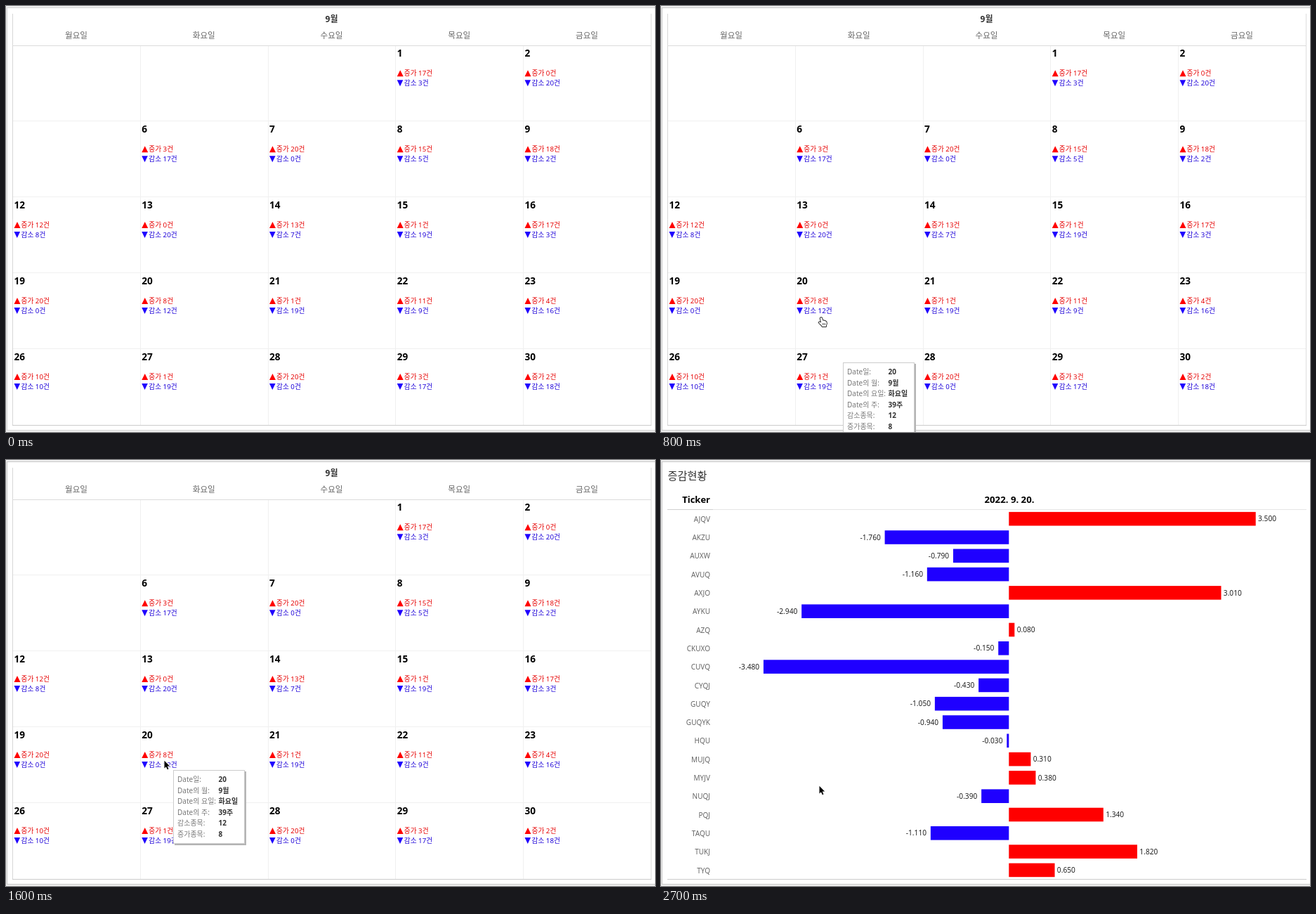
These frames come from a looping animation (924x606 px, 3200 ms). An HTML page with a canvas:

```html
<!DOCTYPE html>
<html lang="ko">
<head>
<title>&#xC99D;&#xAC10;&#xD604;&#xD669;</title>
<style>
  html, body { margin: 0; width: 100%; height: 100%; overflow: hidden; background: #fff; }
  canvas { display: block; }
</style>
</head>
<body>
<canvas id="stage" width="924" height="606"></canvas>
<script>
const ctx = document.getElementById('stage').getContext('2d');
const LOOP = 3200;
const FONT = '"Noto Sans", "Noto Sans CJK KR", "Noto Sans CJK", "Noto Sans CJK JP", sans-serif';
const RED = '#ff0000', BLUE = '#1f00ff';

// Korean words, escaped so they do not depend on the file encoding.
const DAY = '\uC77C', MONTH = '\uC6D4', WEEK = '\uC8FC', OF = '\uC758', COUNT = '\uAC74';
const WEEKDAY = '\uC694\uC77C', UP = '\uC99D\uAC00', DOWN = '\uAC10\uC18C', ITEMS = '\uC885\uBAA9';
const TITLE = '\uC99D\uAC10\uD604\uD669';
const WEEKDAYS = [...'\uC6D4\uD654\uC218\uBAA9\uAE08'].map(c => c + WEEKDAY);

const COL = 181.75, ROW = 107.95, LEFT = 9.5, TOP = 56.5, RIGHT = 918.5, BOTTOM = 596.5;

// Rising items per day; the rest of the 20 fall.
const RISES = {
  1: 17, 2: 0, 6: 3, 7: 20, 8: 15, 9: 18, 12: 12, 13: 0, 14: 13, 15: 1, 16: 17,
  19: 20, 20: 8, 21: 1, 22: 11, 23: 4, 26: 10, 27: 1, 28: 20, 29: 3, 30: 2
};

const CHANGES = [
  ['AJQV', 3.5], ['AKZU', -1.76], ['AUXW', -0.79], ['AVUQ', -1.16], ['AXJO', 3.01],
  ['AYKU', -2.94], ['AZQ', 0.08], ['CKUXO', -0.15], ['CUVQ', -3.48], ['CYQJ', -0.43],
  ['GUQY', -1.05], ['GUQYK', -0.94], ['HQU', -0.03], ['MUJQ', 0.31], ['MYJV', 0.38],
  ['NUQJ', -0.39], ['PQJ', 1.34], ['TAQU', -1.11], ['TUKJ', 1.82], ['TYQ', 0.65]
];

// One pose per 100 ms: pointer from 400 ms, tooltip from 600 ms.
const POINTER = [[358, 586], [314, 530], [243, 484], [234, 461], [228, 443],
                 [227, 433], [226, 429], [225, 428.5], [225, 428]];
const TOOLTIP = [[327, 545, 27], [291, 528, 27], [259, 507, 20], [245, 460, 20],
                 [239, 447, 20], [238, 442, 20], [238, 441, 20]];

const HAND = 'M-1.4 1.2Q0-.8 1.3 1.1L2.3 4.6Q5 3.8 7.5 6.2Q8.6 9 7 11.3V13H1.4L.9 11.8L-3.4 7.4Q-3 5.4 .1 7.6Z';
const ARROW = 'M0 0V10.8L2.4 8.5L4.2 12.6L6 11.8L4.2 7.8H7.6Z';

function text(str, x, y, size, color, weight = 400, align = 'left') {
  ctx.font = `${weight} ${size}px ${FONT}`;
  ctx.fillStyle = color;
  ctx.textAlign = align;
  ctx.fillText(str, x, y + size * 0.36);
}

function line(x1, y1, x2, y2, color) {
  ctx.strokeStyle = color;
  ctx.lineWidth = 1;
  ctx.beginPath();
  ctx.moveTo(x1, y1);
  ctx.lineTo(x2, y2);
  ctx.stroke();
}

function shape(path, x, y, fill, stroke) {
  const p = new Path2D(path);
  ctx.save();
  ctx.translate(x, y);
  if (stroke) {
    ctx.strokeStyle = stroke;
    ctx.lineWidth = 1.8;
    ctx.lineJoin = 'round';
    ctx.stroke(p);
  }
  ctx.fillStyle = fill;
  ctx.fill(p);
  ctx.restore();
}

const pixel = v => Math.floor(v) + 0.5;
const poseAt = (list, t, start) => list[Math.min(list.length - 1, Math.floor((t - start) / 100))];

function drawFrame(t) {
  ctx.fillStyle = '#fff';
  ctx.fillRect(0, 0, 924, 606);
  ctx.fillStyle = '#f0f0f0';
  ctx.fillRect(0, 0, 924, 2);
  ctx.fillRect(0, 604, 924, 2);
  ctx.fillRect(0, 0, 1, 606);
  ctx.strokeStyle = t < 400 ? '#d4d4d4' : '#c6c6c6';
  ctx.lineWidth = 1;
  ctx.strokeRect(1.5, 2.5, 930, 601);
}

function drawDay(day) {
  const slot = day + 2;
  const x = LEFT + (slot % 7) * COL + 2;
  const y = TOP + Math.floor(slot / 7) * ROW;
  const up = RISES[day];
  text(String(day), x, y + 10.6, 13.6, '#000', 600);
  shape('M0 9L4.5 0L9 9Z', x, y + 34.7, RED);
  shape('M0 0H8.6L4.3 9Z', x, y + 48.7, BLUE);
  text(`${UP} ${up}${COUNT}`, x + 10, y + 39.3, 9.7, '#e60000');
  text(`${DOWN} ${20 - up}${COUNT}`, x + 10, y + 53, 9.7, '#1c00d8');
}

function drawCalendar() {
  text('9' + MONTH, 463.5, 19, 12, '#333', 700, 'center');
  WEEKDAYS.forEach((name, i) => text(name, 100 + i * COL, 42, 11.6, '#666', 500, 'center'));
  for (let i = 1; i < 5; i++) {
    const x = pixel(LEFT + i * COL), y = pixel(TOP + i * ROW - 0.5);
    line(x, TOP, x, BOTTOM, '#f0f0f0');
    line(LEFT, y, RIGHT, y, '#f0f0f0');
  }
  line(LEFT, 11, LEFT, BOTTOM, '#d6d6d6');
  line(RIGHT, 11, RIGHT, BOTTOM, '#dedede');
  line(9, TOP, 919, TOP, '#dcdcdc');
  line(9, BOTTOM, 919, BOTTOM, '#cccccc');
  Object.keys(RISES).forEach(day => drawDay(Number(day)));
}

function drawTooltip([x, y, day]) {
  ctx.fillStyle = '#b4b4b4';
  ctx.fillRect(x + 2, y + 2, 102, 105);
  ctx.fillStyle = '#fff';
  ctx.fillRect(x, y, 102, 105);
  ctx.strokeStyle = '#cccccc';
  ctx.lineWidth = 1;
  ctx.strokeRect(x + 0.5, y + 0.5, 101, 104);
  const slot = day + 2;
  const rows = [
    [`Date${DAY}:`, day],
    [`Date${OF} ${MONTH}:`, '9' + MONTH],
    [`Date${OF} ${WEEKDAY}:`, WEEKDAYS[slot % 7]],
    [`Date${OF} ${WEEK}:`, 36 + Math.floor(slot / 7) + WEEK],
    [`${DOWN}${ITEMS}:`, 20 - RISES[day]],
    [`${UP}${ITEMS}:`, RISES[day]]
  ];
  rows.forEach(([label, value], i) => {
    const rowY = y + 13.8 + i * 15.45;
    text(label, x + 6, rowY, 10, '#787878');
    text(String(value), x + 64.5, rowY, 10, '#333', 700);
  });
}

function drawChart() {
  const zero = 495.3, scale = 100.4;
  text(TITLE, 9.5, 23, 15.2, '#333');
  text('Ticker', 70, 56.5, 13, '#000', 600, 'right');
  text('2022. 9. 20.', 496, 56.5, 13.2, '#000', 600, 'center');
  line(9, 70.5, 74, 70.5, '#d0d0d0');
  line(74, 70.5, 919, 70.5, '#e6e6e6');
  line(9, BOTTOM, 919, BOTTOM, '#cccccc');
  CHANGES.forEach(([ticker, value], i) => {
    const y = 83.7 + i * 26.3, end = zero + value * scale, up = value > 0;
    text(ticker, 70, y + 0.5, 10, '#666', 400, 'right');
    ctx.fillStyle = up ? RED : BLUE;
    ctx.fillRect(Math.min(zero, end), y - 9.8, Math.abs(end - zero), 19.6);
    text(value.toFixed(3), end + (up ? 3.3 : -5.8), y, 10.2, '#222', 400, up ? 'left' : 'right');
  });
}

function drawArrow(t) {
  const k = Math.max(0, Math.min(1, (Math.floor(t / 100) - 23) / 4));
  shape(ARROW, 225.5, 427.7 + 36 * k * k * (3 - 2 * k), '#000', '#fff');
}

function drawHand([x, y]) {
  shape(HAND, x, y, '#fff', '#222');
  for (let i = 0; i < 3; i++) {
    const fx = x + 2 + i * 1.7;
    line(fx, y + 8, fx + 0.2, y + 11, '#777');
  }
}

function render(t) {
  drawFrame(t);
  if (t >= 1700) {
    drawChart();
  } else {
    drawCalendar();
    if (t >= 600) drawTooltip(poseAt(TOOLTIP, t, 600));
  }
  if (t >= 1600) drawArrow(t);
  else if (t >= 400) drawHand(poseAt(POINTER, t, 400));
}

const start = performance.now();
function tick() {
  render((performance.now() - start) % LOOP);
  requestAnimationFrame(tick);
}
tick();
</script>
</body>
</html>
```
